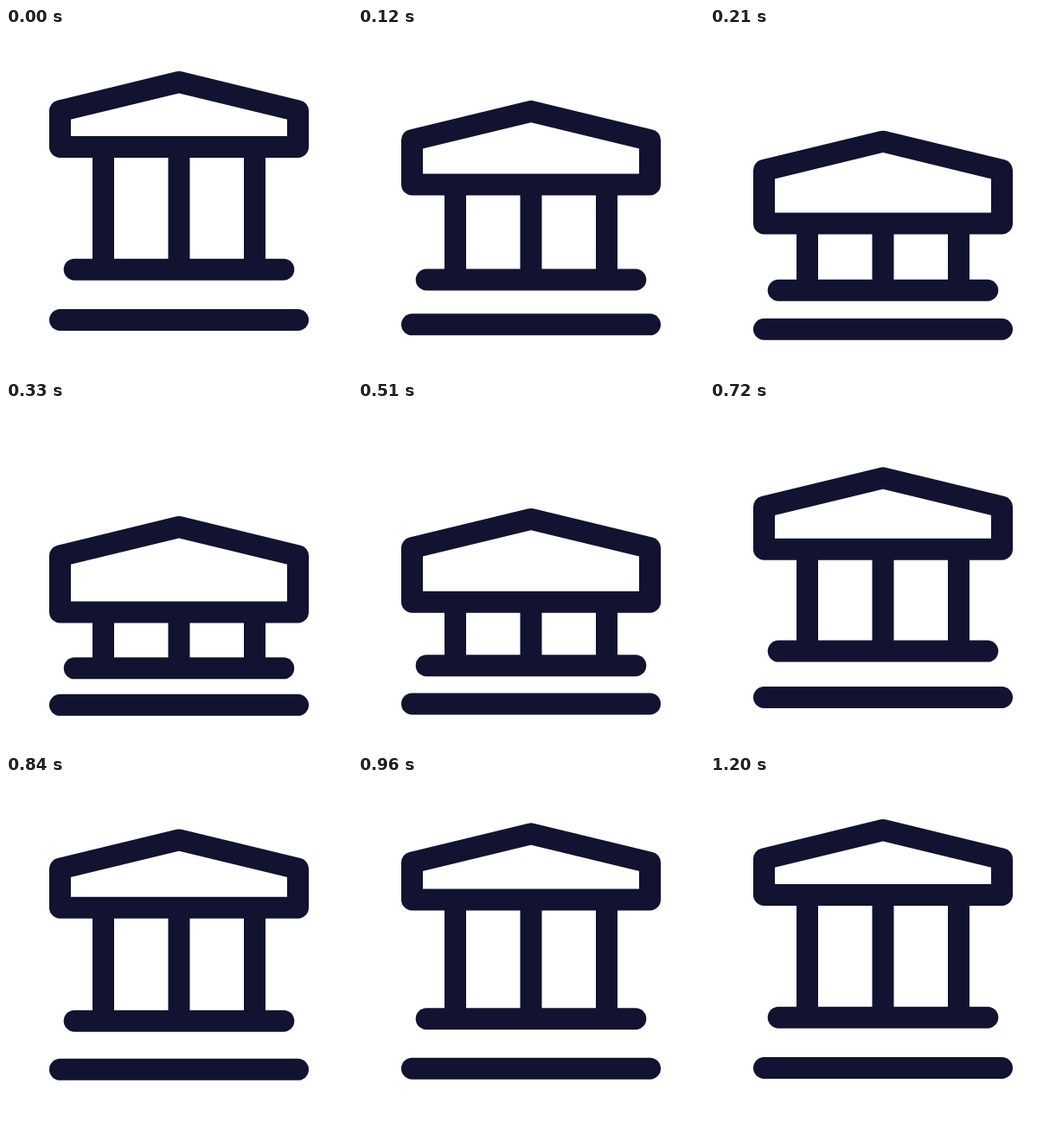
An HTML page with a canvas for the animation above (3.23 s loop, 400 px wide and 400 px high).

```html
<!DOCTYPE html>
<html lang="en">
<head>
<meta charset="utf-8">
<title>Bank icon</title>
<style>
  html, body { margin: 0; width: 100%; height: 100%; overflow: hidden; background: #fff; }
  canvas { display: block; width: 100vmin; height: 100vmin; }
</style>
</head>
<body>
<canvas id="stage" width="400" height="400"></canvas>
<script>
const ctx = document.getElementById('stage').getContext('2d');
const LOOP = 3230, STEP = 30, DOWN = 360, UP = 1200;

// Cubic Bezier easing with flat ends: control points (x1, 0) and (x2, 1)
function ease(x1, x2) {
  return u => {
    if (u <= 0) return 0;
    if (u >= 1) return 1;
    let lo = 0, hi = 1, s;
    for (let i = 0; i < 30; i++) {
      s = (lo + hi) / 2;
      const r = 1 - s;
      const x = 3 * r * r * s * x1 + 3 * r * s * s * x2 + s * s * s;
      if (x < u) lo = s; else hi = s;
    }
    return s * s * (3 - 2 * s);
  };
}

const press = ease(0.38, 0.28);
const release = ease(0.38, 0.18);

function squash(t) {
  return t < DOWN ? press(t / DOWN) : 1 - release((t - DOWN) / (UP - DOWN));
}

function line(cap, points, closed) {
  ctx.lineCap = cap;
  ctx.beginPath();
  points.forEach(([x, y]) => ctx.lineTo(x, y));
  if (closed) ctx.closePath();
  ctx.stroke();
}

function draw(t) {
  const k = squash(t);
  const roof = 82.4 * k;
  const beam = 137.5 + 106 * k;
  const base = 279.2 + 28.8 * k;
  const ground = 337.5 + 12.9 * k;

  ctx.fillStyle = '#fff';
  ctx.fillRect(0, 0, 400, 400);
  ctx.strokeStyle = '#121331';
  ctx.lineWidth = 25;
  ctx.lineJoin = 'round';

  line('butt', [
    [62.5, beam], [62.5, 95.8 + roof], [200, 62.5 + roof],
    [337.5, 95.8 + roof], [337.5, beam]
  ], true);
  for (const x of [112.5, 200, 287.5]) line('butt', [[x, beam], [x, base]]);
  line('round', [[79.2, base], [320.8, base]]);
  line('round', [[62.5, ground], [337.5, ground]]);
}

const start = performance.now();
function tick() {
  const t = (performance.now() - start) % LOOP;
  draw(Math.floor(t / STEP) * STEP);
  requestAnimationFrame(tick);
}
tick();
</script>
</body>
</html>
```
